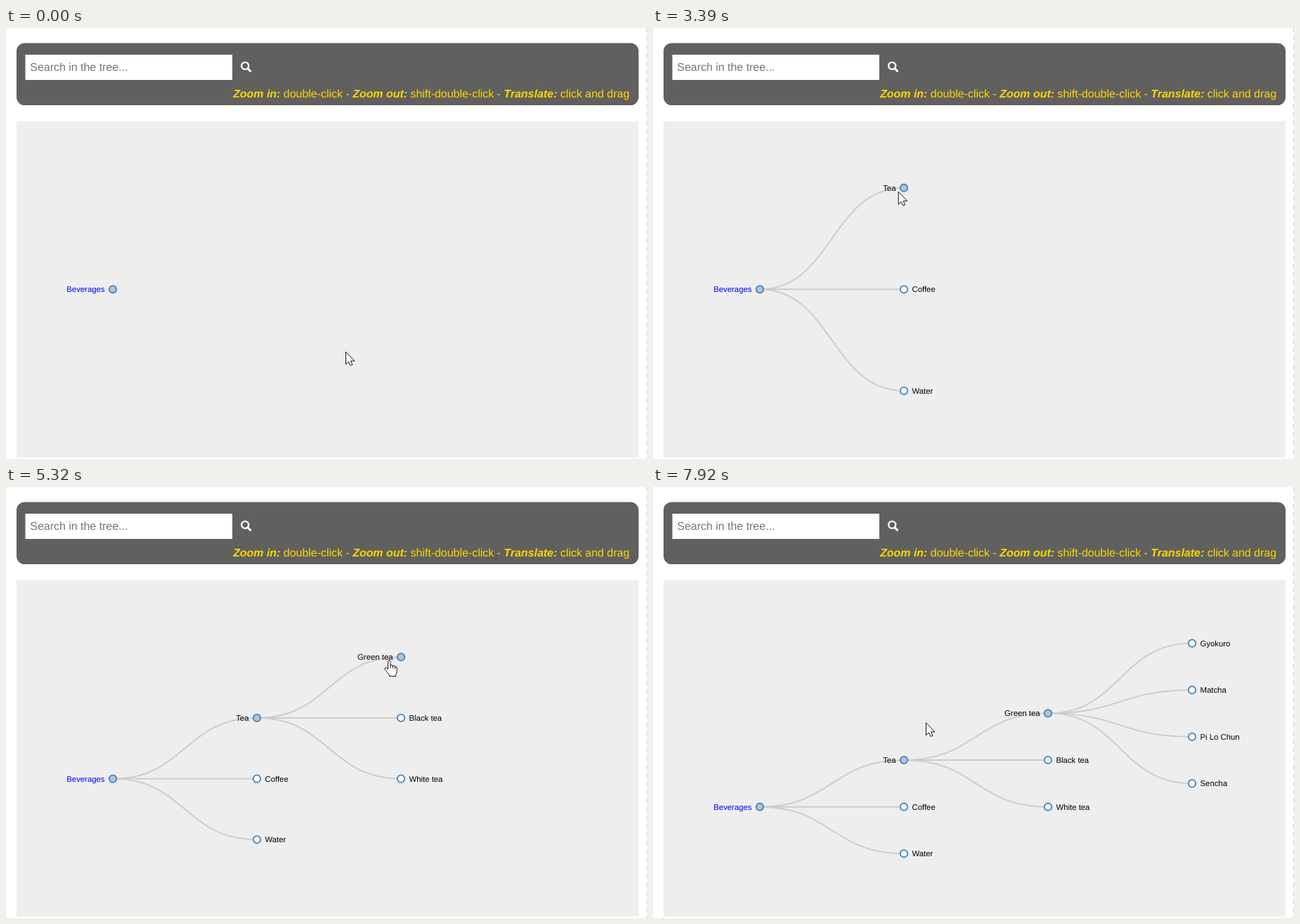
Write an HTML page that moves like this. It is 912 px wide and 614 px high and loops after 7990 ms.

```html
<!DOCTYPE html>
<html lang="en">
<head>
<meta charset="utf-8">
<title>Collapsible tree</title>
<style>
  html, body { margin: 0; width: 100%; height: 100%; overflow: hidden; background: #fff; }
  svg { display: block; font-family: Arial, "Liberation Sans", sans-serif; text-rendering: geometricPrecision; }
  .hint { font-size: 15.95px; fill: #ffd700; text-anchor: end; }
  .hint tspan { font-weight: bold; font-style: italic; }
  .link { fill: none; stroke: #ccc; stroke-width: 1.9; }
  .node circle { stroke: steelblue; stroke-width: 1.8; }
  .cursor { fill: #fff; stroke: #111; stroke-width: 1; stroke-linejoin: round; }
</style>
</head>
<body>
<svg width="912" height="614" viewBox="0 0 912 614">
  <path d="M911.5 0V614" stroke="#d0d0d0" stroke-dasharray="6 6"/>
  <rect x="15" y="21.5" width="885" height="88.5" rx="11.5" fill="#60605e"/>
  <rect x="27.5" y="38" width="294.5" height="36" fill="#fff"/>
  <text x="34.3" y="61" font-size="15.95" fill="#757575">Search in the tree...</text>
  <g fill="none" stroke="#fff" stroke-width="2.4">
    <circle cx="340.2" cy="53.9" r="5"/>
    <path d="M343.8 57.6L347.6 61.4" stroke-width="3" stroke-linecap="round"/>
  </g>
  <text class="hint" x="887" y="99"><tspan>Zoom in:</tspan> double-click - <tspan>Zoom out:</tspan> shift-double-click - <tspan>Translate:</tspan> click and drag</text>
  <rect x="15" y="133" width="885" height="479" fill="#eee"/>
  <g id="links"></g>
  <g id="nodes"></g>
  <g id="pointer">
    <circle id="click" r="14" fill="#ff0" fill-opacity=".47"/>
    <path id="arrow" class="cursor" d="M.5 .3V18.2L4.5 14.4L7.2 20L9.9 18.8L7.4 13.3H13Z"/>
    <path id="hand" class="cursor" d="M-2 13.8V2.5Q-2 1-.3 1Q1.4 1 1.4 2.5V8.5Q1.6 7.3 3 7.5Q4.7 7.6 4.8 9.2Q5.2 8.2 6.3 8.4Q8 8.7 8 10.2Q8.5 9.6 9.4 9.9Q10.7 10.3 10.6 12V17Q10.6 19 9 21.5V23.5H0V22Q-3 18.5-4 16.5L-6.3 14Q-7.3 12.5-6 11.6Q-4.7 11-3.4 12.3ZM1.4 8.5V12M4.8 9V12.5M8 10V13"/>
  </g>
</svg>
<script>
const LOOP = 7990, STEP = 500, FONT = 11.35;
const EXPAND = [2167, 4211, 6593];
const HANDS = [[1340, 2990], [3480, 4400], [5180, 6690]];
const CLICKS = [[2130, 2205], [3990, 4195], [6345, 6545]];

// Time, x, y of the pointer's hot spot
const POINTER = [
  [0, 483, 461], [515, 483, 461], [1300, 146, 373], [1370, 150.5, 372], [2070, 150.5, 372],
  [2140, 151.5, 370], [2210, 151.5, 370], [2300, 150.5, 370], [2840, 150.5, 370],
  [3670, 356, 228], [4910, 356, 228], [5320, 545.5, 246], [5740, 561, 246],
  [5950, 561, 242], [6150, 561, 241], [7510, 561, 241], [7920, 388, 335.5], [LOOP, 388, 335.5]
];

const $ = id => document.getElementById(id);
const clamp = v => Math.min(1, Math.max(0, v));
const mix = (a, b, p) => a + (b - a) * p;
const cubic = v => (v = clamp(v)) < .5 ? 4 * v ** 3 : 1 - 4 * (1 - v) ** 3;
const glide = v => { const s = 1 - (1 - v) ** 2; return s * s * (3 - 2 * s); };
const within = (spans, t) => spans.some(([a, b]) => t >= a && t < b);
const show = (el, on) => el.style.display = on ? '' : 'none';

function add(parent, tag, attrs = {}) {
  const el = document.createElementNS('http://www.w3.org/2000/svg', tag);
  set(el, attrs);
  return parent.appendChild(el);
}
function set(el, attrs) {
  for (const k in attrs) el.setAttribute(k, attrs[k]);
}

// ys: vertical place in each layout from the one where the node appears
const nodes = [];
function node(name, parent, ...ys) {
  const n = { name, parent, ys, depth: parent ? parent.depth + 1 : 0 };
  if (parent) {
    parent.inner = true;
    n.link = add($('links'), 'path', { class: 'link' });
  }
  nodes.push(n);
  return n;
}
const root = node('Beverages', null, 372.3, 372.3, 415.6, 455.7);
const tea = node('Tea', root, 227.7, 329, 389);
node('Coffee', root, 372.3, 415.6, 455.7);
node('Water', root, 516.9, 502.3, 522.3);
const green = node('Green tea', tea, 242.3, 322.4);
node('Black tea', tea, 329, 389);
node('White tea', tea, 415.6, 455.7);
['Gyokuro', 'Matcha', 'Pi Lo Chun', 'Sencha'].forEach((name, i) => node(name, green, 222.6 + 66.6 * i));

for (const n of nodes) {
  n.group = add($('nodes'), 'g', { class: 'node' });
  n.circle = add(n.group, 'circle', { fill: n.inner ? 'lightsteelblue' : '#fff' });
  n.label = add(n.group, 'text', {
    x: n.inner ? -11.5 : 11.5, y: .35 * FONT, 'font-size': FONT,
    'text-anchor': n.inner ? 'end' : 'start', fill: n === root ? '#00f' : '#000'
  });
  n.label.textContent = n.name;
}

// Nodes not yet opened sit on their parent
const place = (n, layout) => layout < n.depth
  ? place(n.parent, layout)
  : { x: 152 + 205 * n.depth, y: n.ys[layout - n.depth] };

function drawTree(t) {
  const layout = EXPAND.filter(s => t >= s).length;
  const p = layout ? cubic((t - EXPAND[layout - 1]) / STEP) : 1;
  for (const n of nodes) {
    const visible = n.depth <= layout;
    show(n.group, visible);
    if (n.link) show(n.link, visible);
    if (!visible) continue;
    const to = place(n, layout), from = layout ? place(n, layout - 1) : to;
    n.x = mix(from.x, to.x, p);
    n.y = mix(from.y, to.y, p);
    const growth = n.depth && n.depth === layout ? p : 1;
    set(n.group, { transform: `translate(${n.x} ${n.y})` });
    set(n.circle, { r: 5.2 * growth });
    set(n.label, { 'fill-opacity': growth });
    if (n.link) {
      const s = n.parent, mid = (s.x + n.x) / 2;
      set(n.link, { d: `M${s.x} ${s.y}C${mid} ${s.y} ${mid} ${n.y} ${n.x} ${n.y}` });
    }
  }
  const hover = cubic((t - 1375) / STEP) - cubic((t - 2930) / STEP);
  set(root.label, { 'font-size': FONT * (1 + hover), y: .35 * FONT + 32.7 * hover });
}

function drawPointer(t) {
  const i = POINTER.findIndex(k => k[0] > t);
  const [t0, x0, y0] = POINTER[i - 1], [t1, x1, y1] = POINTER[i];
  const p = glide((t - t0) / (t1 - t0));
  set($('pointer'), { transform: `translate(${mix(x0, x1, p)} ${mix(y0, y1, p)})` });
  const hand = within(HANDS, t);
  show($('hand'), hand);
  show($('arrow'), !hand);
  show($('click'), within(CLICKS, t));
}

function frame() {
  const t = performance.now() % LOOP;
  drawTree(t);
  drawPointer(t);
  requestAnimationFrame(frame);
}
frame();
</script>
</body>
</html>
```
